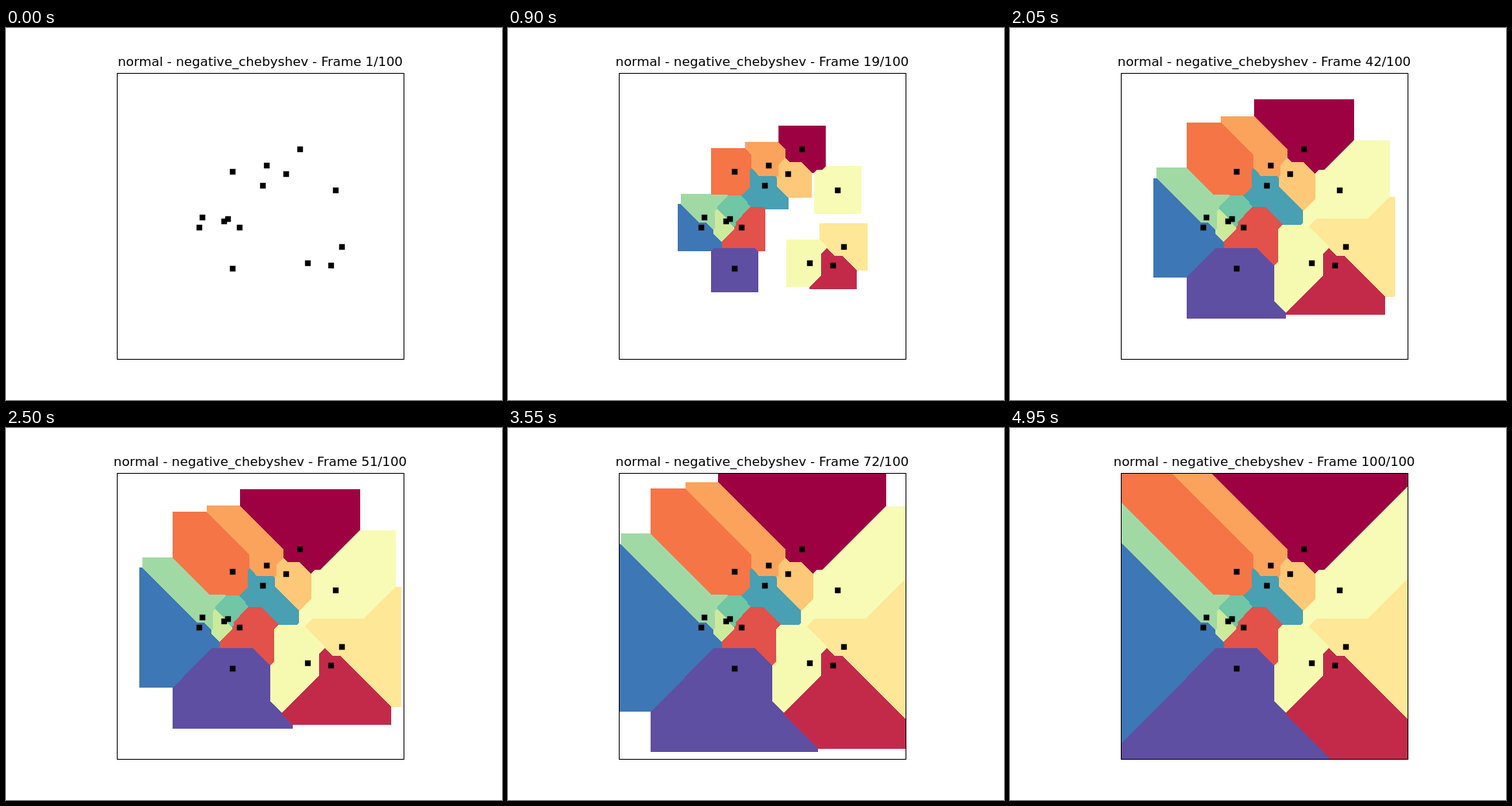
An HTML page with a canvas for the animation above (5000 ms loop, 640x480 px).

```html
<!DOCTYPE html>
<html lang="en">
<head>
<meta charset="utf-8">
<title>Growing Chebyshev cells</title>
<style>
  html, body { margin: 0; width: 100%; height: 100%; overflow: hidden; background: #fff; }
  canvas { display: block; }
</style>
</head>
<body>
<canvas id="stage" width="640" height="480"></canvas>
<script>
const ctx = document.getElementById('stage').getContext('2d');
const STEPS = 100, STEP_MS = 50;
const LEFT = 144, TOP = 59, WIDTH = 369, HEIGHT = 368;
const START_RADIUS = 4.2, GROWTH = 1.4636;

// x, y, colour of each cell's centre
const seeds = [
  [379.5, 156.3, 0x9e0142],
  [419.6, 306.0, 0xc32a4a],
  [301.9, 257.8, 0xe2514a],
  [292.2, 185.8, 0xf57547],
  [336.7, 177.8, 0xfba35c],
  [361.8, 188.8, 0xfdc877],
  [433.0, 282.3, 0xfee797],
  [425.5, 209.0, 0xf8fbb5],
  [389.3, 303.6, 0xf6fab1],
  [281.2, 249.7, 0xcbea9c],
  [253.7, 244.3, 0xa1d9a4],
  [286.2, 246.6, 0x70c6a5],
  [331.5, 203.7, 0x48a0b2],
  [249.3, 257.8, 0x3d77b5],
  [292.2, 310.3, 0x5e4fa2]
];

// Nearest seed and its Chebyshev distance for every pixel of the plot
const owner = new Uint8Array(WIDTH * HEIGHT);
const distance = new Float32Array(WIDTH * HEIGHT).fill(Infinity);
for (let p = 0; p < owner.length; p++) {
  const x = LEFT + p % WIDTH + 0.5;
  const y = TOP + Math.floor(p / WIDTH) + 0.5;
  seeds.forEach(([sx, sy], i) => {
    const d = Math.max(Math.abs(x - sx), Math.abs(y - sy));
    if (d < distance[p]) {
      distance[p] = d;
      owner[p] = i;
    }
  });
}

const image = ctx.createImageData(WIDTH, HEIGHT);
const pixels = new Uint32Array(image.data.buffer);
const WHITE = 0xffffffff;
const packed = seeds.map(([, , c]) =>
  (0xff000000 | (c & 255) << 16 | (c & 0xff00) | c >> 16) >>> 0);

function drawCells(step) {
  const radius = step ? START_RADIUS + GROWTH * step : 0;
  for (let p = 0; p < pixels.length; p++) {
    pixels[p] = distance[p] <= radius ? packed[owner[p]] : WHITE;
  }
  ctx.putImageData(image, LEFT, TOP);
}

function drawMarkers() {
  for (const [x, y] of seeds) {
    ctx.fillRect(Math.round(x - 3.5) - 0.2, Math.round(y - 3.5) - 0.2, 7.4, 7.4);
  }
}

function draw(step) {
  ctx.fillStyle = '#fff';
  ctx.fillRect(0, 0, 640, 480);
  drawCells(step);
  ctx.fillStyle = ctx.strokeStyle = '#000';
  drawMarkers();
  ctx.lineWidth = 1;
  ctx.strokeRect(143.5, 58.5, 370, 369);
  ctx.font = '16.667px "DejaVu Sans", sans-serif';
  ctx.textAlign = 'center';
  ctx.fillText(`normal - negative_chebyshev - Frame ${step + 1}/${STEPS}`, 328, 49);
}

let shown = -1;
function tick() {
  const step = Math.floor(performance.now() / STEP_MS) % STEPS;
  if (step !== shown) draw(shown = step);
  requestAnimationFrame(tick);
}
tick();
</script>
</body>
</html>
```
